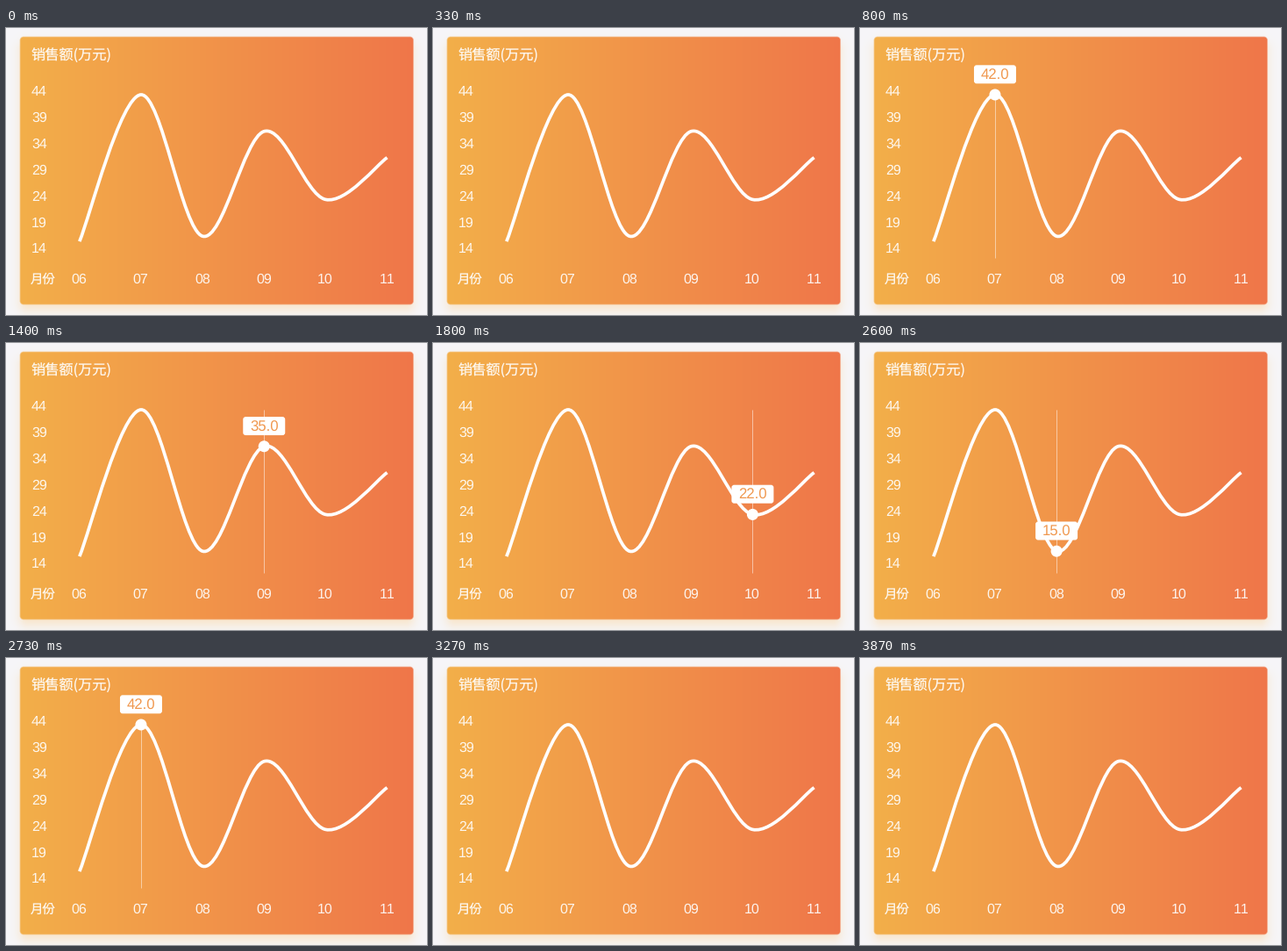
Recreate the animation shown at these times as a matplotlib script. Size 480x327 px, loop 3940 ms.

```python
import matplotlib.pyplot as plt
import numpy as np
from matplotlib.animation import FuncAnimation
from matplotlib.patches import Circle, FancyBboxPatch, PathPatch
from matplotlib.path import Path

W, H, DPI = 480, 327, 64
LOOP, STEP = 3940, 20
LATIN, CJK = "Liberation Sans", "Noto Sans CJK JP"

MONTHS = ["06", "07", "08", "09", "10", "11"]
SALES = [14, 42, 15, 35, 22, 30]
TOP, BOTTOM = 76, 262

# (start in ms, selected month index or None)
TOUCHES = [
    (0, None), (330, 0), (590, 1), (930, 2), (1190, 3), (1720, 4),
    (2330, 5), (2460, 4), (2530, 3), (2590, 2), (2660, 1),
    (2920, 0), (3190, None),
]

plt.rcParams["text.hinting"] = "none"
plt.rcParams["text.kerning_factor"] = 6  # evenly spaced digits


def px(size):
    """Pixels to points."""
    return size * 72 / DPI


def point(i):
    return np.array([83.8 + 70.15 * i, TOP + (42 - SALES[i]) * 5.97])


def smooth_path(pts):
    """Catmull-Rom spline as cubic Beziers."""
    p = [pts[0], *pts, pts[-1]]
    verts = [pts[0]]
    for a, b, c, d in zip(p, p[1:], p[2:], p[3:]):
        verts += [b + (c - a) / 6, c - (d - b) / 6, c]
    return Path(verts, [Path.MOVETO] + [Path.CURVE4] * (len(verts) - 1))


def box_distance(x, y, x0, y0, x1, y1, r):
    """Signed distance to a rounded rectangle."""
    qx = np.abs(x - (x0 + x1) / 2) - (x1 - x0) / 2 + r
    qy = np.abs(y - (y0 + y1) / 2) - (y1 - y0) / 2 + r
    outer = np.hypot(np.maximum(qx, 0), np.maximum(qy, 0))
    return outer + np.minimum(np.maximum(qx, qy), 0) - r


def backdrop():
    y, x = np.mgrid[0:H, 0:W] + 0.5

    def mix(a, b, t):
        return a + (b - a) * t[..., None]

    page = np.array([246, 246, 249.0])
    glow = np.array([253, 205, 135.0])
    left, right = np.array([243, 175, 74.0]), np.array([239, 118, 73.0])
    shade = box_distance(x, y, 17, 18, 463.5, 321, 8)
    img = mix(page, glow, 0.45 / (1 + np.exp(shade / 4)))
    fill = mix(left, right, np.clip((x - 16) / 448.5, 0, 1))
    card = box_distance(x, y, 16, 10, 464.5, 315, 4)
    cover = np.clip(0.5 - card / 1.6, 0, 1)[..., None]
    return (img * (1 - cover) + fill * cover) / 255


fig = plt.figure(figsize=(W / DPI, H / DPI), dpi=DPI)
ax = fig.add_axes([0, 0, 1, 1])
ax.imshow(backdrop(), extent=(0, W, H, 0), interpolation="nearest", aspect="auto")
ax.set(xlim=(0, W), ylim=(H, 0))
ax.axis("off")


def label(x, y, text, size, font=LATIN, ha="left", color="white", **kw):
    return ax.text(x, y, text, fontsize=px(size), family=font, ha=ha,
                   va="baseline", color=color, **kw)


label(29, 37, "销售额(万元)", 16.2, CJK, alpha=0.9)
label(28, 290.8, "月份", 14.4, CJK, alpha=0.9)
for k, value in enumerate(range(44, 13, -5)):
    label(29, 77.3 + 29.85 * k, str(value), 16, alpha=0.9)
for k, month in enumerate(MONTHS):
    label(point(k)[0] - 0.3, 291, month, 16, ha="center", alpha=0.9)

ax.add_patch(PathPatch(smooth_path([point(i) for i in range(6)]), fc="none",
                       ec="white", lw=px(3.7), capstyle="butt", zorder=3))

guide, = ax.plot([], [], color="white", alpha=0.5, lw=px(1),
                 solid_capstyle="butt", zorder=2)
dot = ax.add_patch(Circle((0, 0), 6.5, fc="white", ec="none", zorder=4))
bubble = ax.add_patch(FancyBboxPatch((0, 0), 48, 21, fc="white", ec="none",
                                     boxstyle="round,pad=0,rounding_size=3",
                                     zorder=5))
reading = label(0, 0, "", 16.8, ha="center", color="#f0984f", zorder=6)
marker = [guide, dot, bubble, reading]


def draw(n):
    now = n * STEP
    selected = [i for start, i in TOUCHES if start <= now][-1]
    for part in marker:
        part.set_visible(selected is not None)
    if selected is not None:
        x, y = point(selected)
        guide.set_data([x, x], [TOP, BOTTOM])
        dot.center = x, y
        bubble.set_x(x - 24)
        bubble.set_y(y - 33.7)
        reading.set_position((x, y - 17.2))
        reading.set_text(f"{SALES[selected]:.1f}")
    return marker


anim = FuncAnimation(fig, draw, frames=LOOP // STEP, interval=STEP,
                     repeat=True, repeat_delay=0)
plt.show()
```
